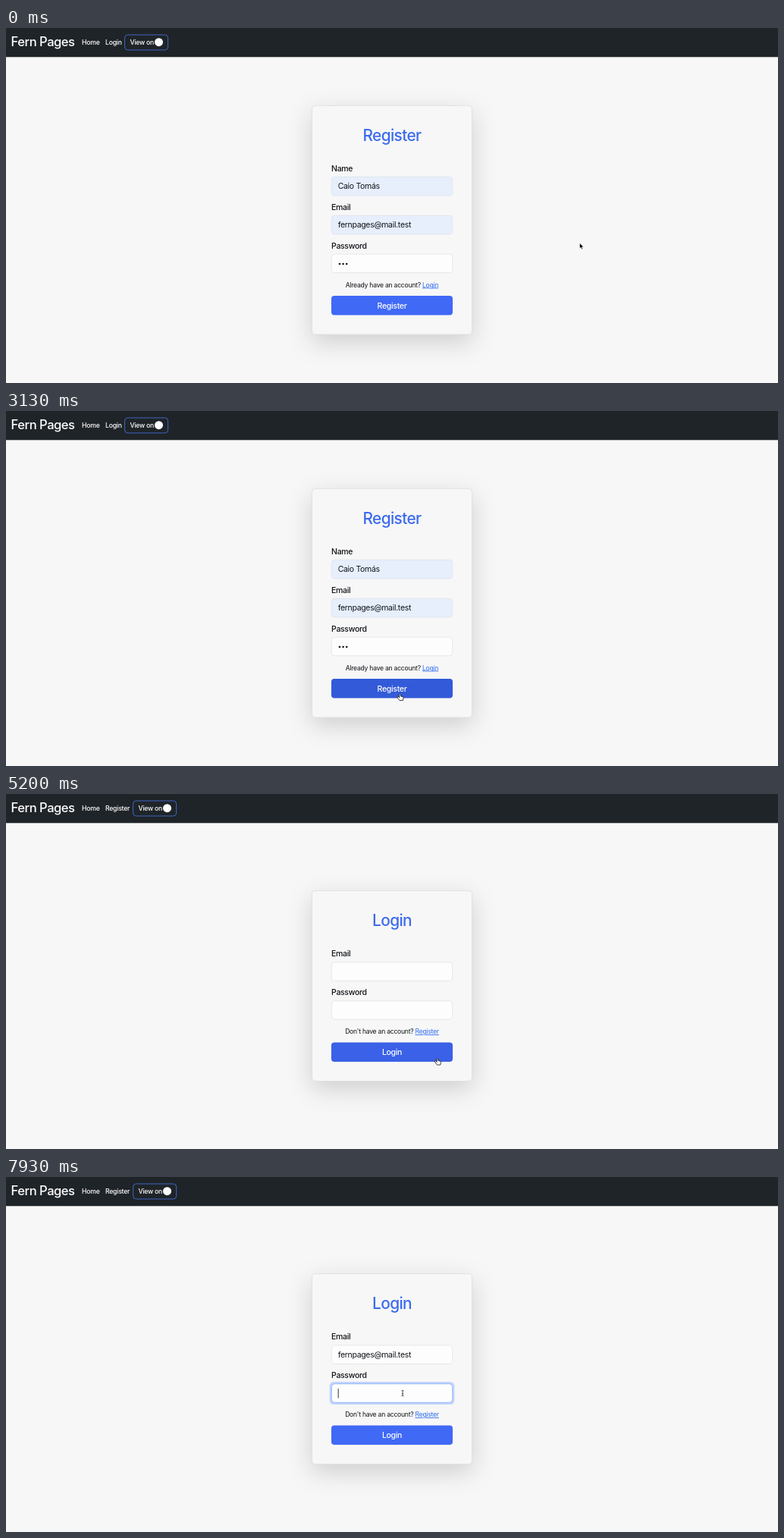
Animation, 1018 px wide and 468 px high, one loop 8 s. Source, as an HTML page:

```html
<!DOCTYPE html>
<html lang="en">
<head>
<meta charset="utf-8">
<title>Sign up and log in</title>
<style>
  html, body { margin: 0; width: 100%; height: 100%; overflow: hidden; background: #f7f7f7; }
  svg { display: block; width: 1018px; height: 468px; }
  text { font: 400 10.5px Inter, "Liberation Sans", sans-serif; letter-spacing: -.03em; fill: #111418; }
  .brand { font-size: 16.6px; font-weight: 500; fill: #fff; }
  .nav { font-size: 8.7px; font-weight: 500; fill: #fff; }
  .title { font-size: 20.8px; font-weight: 500; fill: #3b6aee; }
  .label { font-weight: 500; }
  .hint { font-size: 8.65px; }
  .link { fill: #2f6cf0; text-decoration: underline; }
  .action { font-weight: 500; fill: #fff; }
  .mid { text-anchor: middle; }
  .card { fill: #f7f7f7; stroke: #dfe0e2; filter: drop-shadow(0 10.7px 16px rgba(0, 0, 0, .16)); }
  .field { fill: #fdfdfd; stroke: #dee2e6; stroke-width: .8; }
  .filled { fill: #e7effd; }
  .focus { stroke: #86aaf6; outline: 0; }
  .ring { fill: #c3d5fc; }
</style>
</head>
<body>
<svg id="stage" viewBox="0 0 1018 468"></svg>
<script>
const EMAIL = 'fernpages@mail.test';
const LOOP = 8000, SWITCH = 4400, FOCUS = 5860, PASTE = 6330, NEXT = 7800;

const text = (x, y, cls, s) => `<text x="${x}" y="${y}" class="${cls}">${s}</text>`;
const box = (x, y, w, h, r, attrs) =>
  `<rect x="${x}" y="${y}" width="${w}" height="${h}" rx="${r}" ${attrs}/>`;

// One labelled input; y is the top of its box.
const field = (y, label, id, cls = '', value = '') =>
  text(429, y - 7.3, 'label', label) +
  box(426.6, y - 2.4, 164.8, 30, 5.5, `class="ring" id="${id}Ring" visibility="hidden"`) +
  box(429.3, y + .3, 159.4, 24.6, 4, `class="field ${cls}" id="${id}"`) +
  text(437.7, y + 16.3, '', value);

function page(id, other, top, height, fields, question) {
  const shift = id === 'Login' ? 11 : 0;
  const end = top + height;
  return `<g id="${id}">
    ${text(131, 22.3, 'nav', other)}
    ${box(156.6 + shift, 9, 57, 20, 4, 'fill="none" stroke="#4065c4"')}
    ${text(163.5 + shift, 22.3, 'nav', 'View on')}
    <circle cx="${201.5 + shift}" cy="18.7" r="5.5" fill="#fff"/>
    ${box(403.5, top, 211, height, 4, 'class="card"')}
    ${text(509, top + 46.3, 'title mid', id)}
    ${fields}
    ${text(509, end - 62.5, 'hint mid', `${question} <tspan class="link">${other}</tspan>`)}
    ${box(429, end - 51, 160, 25.4, 4, `id="${id}Button"`)}
    ${text(509, end - 34.3, 'action mid', id)}
  </g>`;
}

const dots = [440, 444.6, 449.2].map(x => `<circle cx="${x}" cy="311" r="1.3" fill="#111"/>`).join('');

document.getElementById('stage').innerHTML =
  box(0, 0, 1018, 38.3, 0, 'fill="#1f2428"') +
  text(6.6, 23.5, 'brand', 'Fern Pages') +
  text(100, 22.3, 'nav', 'Home') +
  page('Register', 'Login', 102.3, 301.7,
    field(196, 'Name', 'name', 'filled', 'Caio Tomás') +
    field(246.9, 'Email', 'mail', 'filled', EMAIL) +
    field(297.8, 'Password', 'pass') + dots,
    'Already have an account?') +
  page('Login', 'Register', 127.6, 250.9,
    field(221.5, 'Email', 'loginMail', '', '<tspan id="typed"></tspan>') +
    field(272.4, 'Password', 'loginPass'),
    "Don't have an account?") +
  `<path id="caret" stroke="#222" stroke-width=".9"/>
  <g id="cursor">
    <path id="arrow" d="M0 0V7.2L1.7 5.7 2.8 8.2 4 7.7 2.9 5.3H5.1Z"
      fill="#000" stroke="#fff" stroke-width=".5"/>
    <path id="hand" d="M-.9 5V.6Q0-.5.9.6V3L4 3.8Q4.7 4 4.5 5L3.8 8.6H-.5L-3.2 5.2Q-3-.0-.9 5Z"
      fill="#fff" stroke="#111" stroke-width=".8"/>
    <path id="beam" d="M-1.5-3.6Q0-3.6 0-2.8Q0-3.6 1.5-3.6M0-2.8V2.8M-1.5 3.6Q0 3.6 0 2.8Q0 3.6 1.5 3.6M-.9.8H.9"
      fill="none" stroke="#222" stroke-width=".8"/>
  </g>`;

const $ = id => document.getElementById(id);
const show = (id, on) => $(id).setAttribute('visibility', on ? 'visible' : 'hidden');

// Pointer path: time, x, y
const path = [
  [0, 756.5, 283.5], [60, 756.5, 283.5], [860, 697, 328], [1330, 626.5, 348.5],
  [1800, 552, 360], [2260, 522, 364], [2530, 522, 364], [2860, 520, 386],
  [3130, 519.5, 373], [3240, 519.5, 373], [3450, 523, 386], [4000, 603, 356],
  [5100, 603, 356], [5200, 569, 348.5], [5330, 569, 348.5],
  [5900, 505, 247.5], [7600, 505, 247.5], [7860, 523, 285], [8000, 523, 285]
];

function pointer(t) {
  const i = Math.max(1, path.findIndex(p => p[0] >= t));
  const [t0, x0, y0] = path[i - 1], [t1, x1, y1] = path[i];
  const k = Math.max(0, (t - t0) / (t1 - t0));
  return [x0 + (x1 - x0) * k, y0 + (y1 - y0) * k];
}

const inside = ([x, y], top) => x > 429 && x < 589 && y > top && y < top + 25.4;
const overButton = t => inside(pointer(t), t < SWITCH ? 353 : 327.5);

// Share of the last 150 ms spent over the button gives its colour fade.
function hover(t) {
  let n = 0;
  for (let i = 0; i < 10; i++) n += overButton(Math.max(0, t - i * 15));
  return n / 10;
}

function draw() {
  const t = performance.now() % LOOP;
  const login = t >= SWITCH;
  $('Register').style.display = login ? 'none' : '';
  $('Login').style.display = login ? '' : 'none';

  const h = hover(t);
  const rgb = [[64, 105, 246], [48, 86, 208]];
  const fill = `rgb(${rgb[0].map((c, i) => Math.round(c + (rgb[1][i] - c) * h))})`;
  $(login ? 'LoginButton' : 'RegisterButton').setAttribute('fill', fill);

  const onMail = t >= FOCUS && t < NEXT, onPass = t >= NEXT;
  for (const [id, on] of [['loginMail', onMail], ['loginPass', onPass]]) {
    $(id).classList.toggle('focus', on);
    $(id + 'Ring').style.visibility = on ? 'visible' : 'hidden';
  }
  const pasted = t >= PASTE;
  $('typed').textContent = pasted ? EMAIL : '';

  const since = onPass ? t - NEXT : pasted ? t - PASTE : t - FOCUS;
  const x = onMail && pasted ? 438 + $('typed').getComputedTextLength() : 438.2;
  $('caret').setAttribute('d', `M${x} ${onPass ? 279 : 228}v12.5`);
  show('caret', (onMail || onPass) && since % 1000 < 500);

  const p = pointer(t);
  const button = overButton(t);
  const beam = login && (inside(p, 221.5) || inside(p, 272.4));
  $('cursor').setAttribute('transform', `translate(${p})`);
  show('hand', button);
  show('beam', beam);
  show('arrow', !button && !beam);
  requestAnimationFrame(draw);
}
draw();
</script>
</body>
</html>
```
